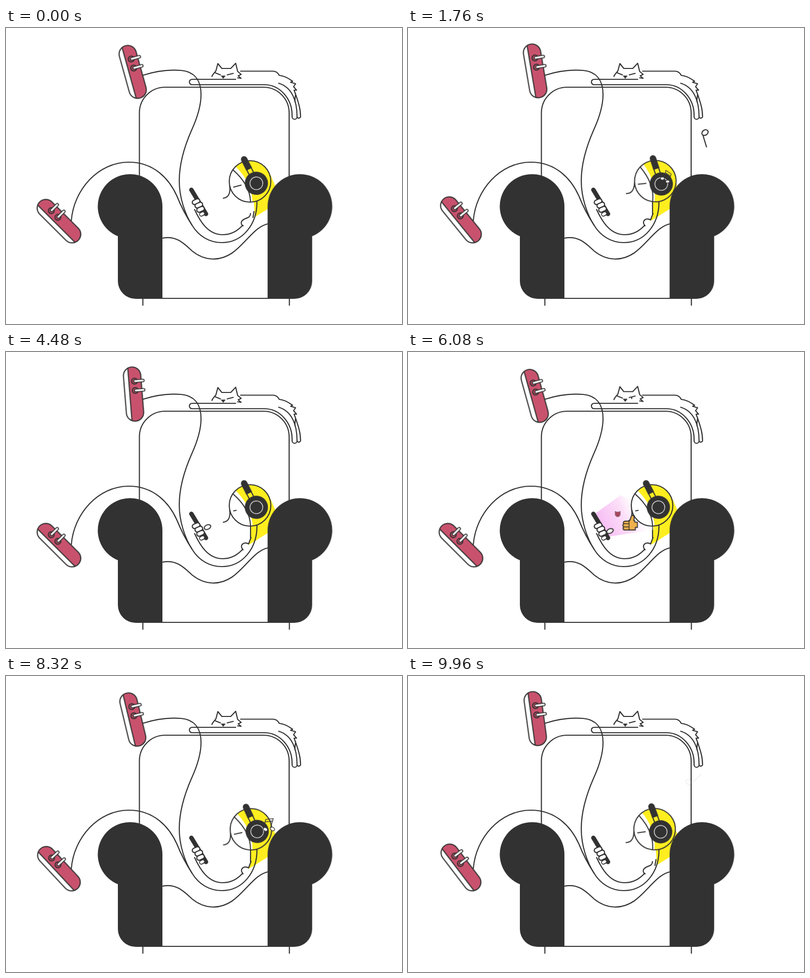
An HTML page without scripts for the animation above (10 s loop, 800 px wide and 600 px high).

```html
<!DOCTYPE html>
<html lang="en">
<head>
<meta charset="utf-8">
<title>Listening in the armchair</title>
<style>
  html, body { margin: 0; width: 100%; height: 100%; overflow: hidden; background: #fff; }
  svg { display: block; width: 100vw; height: 100vh; }
  .line { fill: none; stroke: #323232; stroke-width: 2.2; stroke-linecap: round; stroke-linejoin: round; }
  .white { fill: #fff; }
  .rose { fill: #c8526d; }
  .dark { fill: #323232; }
  .yellow { fill: #ffee1f; }

  .bob, .toe, .nod { animation: bob 10s cubic-bezier(.37, 0, .63, 1) infinite; }
  .bob { transform-origin: 132px 390px; }
  .toe { transform-origin: 276px 96px; animation-name: toe; }
  .nod { transform-origin: 500px 353px; animation-name: nod; }

  @keyframes bob {
    0%, 10.13%, 20.27%, 30.4%, 40.53%, 73%, 81.7%, 92.35% { transform: rotate(0deg); }
    5.07%, 15.2%, 25.33%, 35.47%, 77.35%, 87% { transform: rotate(11deg); }
    97.67% { transform: rotate(11deg); animation-timing-function: cubic-bezier(.4, 0, .8, .7); }
    100% { transform: rotate(6.6deg); }
  }
  @keyframes toe {
    0%, 10.13%, 20.27%, 30.4%, 40.53%, 50.66%, 60.8%, 73%, 81.7%, 92.35% { transform: rotate(0deg); }
    5.07%, 15.2%, 25.33%, 35.47%, 45%, 55.73%, 66.9%, 77.35%, 87% { transform: rotate(11deg); }
    97.67% { transform: rotate(11deg); animation-timing-function: cubic-bezier(.4, 0, .8, .7); }
    100% { transform: rotate(6.6deg); }
  }
  @keyframes nod {
    0%, 11.1%, 21.5%, 30.8%, 40.6%, 73%, 81.4%, 92.35% { transform: rotate(0deg); }
    5.6%, 16.6%, 26.3%, 35.6%, 77.2%, 86.8% { transform: rotate(10deg); }
    97.67% { transform: rotate(10deg); animation-timing-function: cubic-bezier(.4, 0, .8, .7); }
    100% { transform: rotate(6deg); }
  }

  /* hard switches */
  .tucked { animation: tucked 10s step-end infinite; }
  .loose { animation: loose 10s step-end infinite; }
  .awake { animation: awake 10s step-end infinite; }
  .asleep { animation: asleep 10s step-end infinite; }
  .peeking { animation: peeking 10s step-end infinite; }
  .napping { animation: napping 10s step-end infinite; }
  @keyframes tucked { 0%, 25%, 90% { opacity: 1; } 11%, 42.5% { opacity: 0; } }
  @keyframes loose { 0%, 25%, 90% { opacity: 0; } 11%, 42.5% { opacity: 1; } }
  @keyframes awake { 0%, 73% { opacity: 0; } 42% { opacity: 1; } }
  @keyframes asleep { 0%, 73% { opacity: 1; } 42% { opacity: 0; } }
  @keyframes peeking { 0%, 70% { opacity: 0; } 54% { opacity: 1; } }
  @keyframes napping { 0%, 70% { opacity: 1; } 54% { opacity: 0; } }

  .ears { animation: ears 10s infinite; }
  @keyframes ears { 0%, 53%, 72%, 100% { transform: none; } 55%, 70% { transform: translateY(-1.7px); } }

  .phone { transform-origin: 389px 353px; animation: tilt 10s infinite; }
  @keyframes tilt { 0%, 30%, 37%, 100% { transform: none; } 33%, 34% { transform: rotate(-7deg); } }

  .thumb { animation: tap 10s infinite; }
  @keyframes tap {
    0%, 42%, 73%, 100% { opacity: 0; transform: none; }
    43%, 45.5%, 52%, 57%, 64%, 69% { opacity: 1; transform: none; }
    48%, 54%, 60.8%, 66%, 72% { opacity: 1; transform: translate(1px, 8px); }
  }
  .glow { animation: glow 10s infinite; }
  @keyframes glow { 0%, 49%, 71%, 100% { opacity: 0; } 51%, 69% { opacity: 1; } }
  .like { animation: like 10s ease-out infinite; }
  .imp { animation: imp 10s ease-out infinite; }
  @keyframes like {
    0%, 54% { opacity: 0; transform: translate(394px, 353px) scale(.2); }
    55% { opacity: 1; }
    60.8% { opacity: 1; transform: translate(448.5px, 347px) scale(1.06); }
    66%, 100% { opacity: 0; transform: translate(478px, 343px) scale(1.15); }
  }
  @keyframes imp {
    0%, 58% { opacity: 0; transform: translate(394px, 350px) scale(.2); }
    58.5% { opacity: 1; }
    60.8% { opacity: 1; transform: translate(423.5px, 328px); }
    68%, 100% { opacity: 0; transform: translate(464px, 305px) scale(2); }
  }

  .note { opacity: 0; animation: 10s linear infinite; }
  .n1 { animation-name: n1; }
  .n2 { animation-name: n2; }
  .n3 { animation-name: n3; }
  .n4 { animation-name: n4; }
  @keyframes n1 {
    0%, 10.8% { opacity: 0; transform: translate(508px, 314px) scale(.3); }
    11.2% { opacity: 1; }
    17.6% { opacity: 1; transform: translate(600px, 212px); }
    25% { opacity: 1; }
    30%, 100% { opacity: 0; transform: translate(629px, 203px) rotate(-15deg); }
  }
  @keyframes n2 {
    0%, 15.5% { opacity: 0; transform: translate(508px, 316px) scale(.35); }
    16% { opacity: 1; }
    17.6% { opacity: 1; transform: translate(521px, 301px) scale(.55) rotate(12deg); }
    25% { opacity: 1; transform: translate(536px, 236px) scale(.9) rotate(10deg); }
    30.5% { opacity: 1; }
    33.2% { opacity: .07; transform: translate(528px, 189px); }
    33.8%, 100% { opacity: 0; transform: translate(527px, 186px); }
  }
  @keyframes n3 {
    0%, 81.8% { opacity: 0; transform: translate(508px, 316px) scale(.35) rotate(15deg); }
    82.2% { opacity: 1; }
    83.2% { opacity: 1; transform: translate(533px, 302px) scale(.65) rotate(15deg); }
    90% { opacity: 1; transform: translate(604px, 243px) rotate(5deg); }
    94.5% { opacity: 1; }
    98.5%, 100% { opacity: 0; transform: translate(631px, 211px) rotate(-8deg); }
  }
  @keyframes n4 {
    0%, 86.5% { opacity: 0; transform: translate(508px, 314px) scale(.3) rotate(-120deg); }
    87% { opacity: 1; }
    92% { opacity: 1; transform: translate(552px, 262px) rotate(-130deg); }
    97% { opacity: 1; }
    99.6% { opacity: .07; transform: translate(568px, 215px) rotate(-118deg); }
    100% { opacity: 0; transform: translate(569px, 212px) rotate(-118deg); }
  }
</style>
</head>
<body>
<svg viewBox="0 0 800 600">
  <defs>
    <clipPath id="skull"><circle cx="493" cy="311" r="42"/></clipPath>
    <linearGradient id="beam" gradientUnits="userSpaceOnUse" x1="390" y1="352" x2="470" y2="315">
      <stop offset="0" stop-color="#f7bdf4"/>
      <stop offset=".6" stop-color="#fce0f8"/>
      <stop offset="1" stop-color="#fff" stop-opacity=".3"/>
    </linearGradient>
    <g id="lace">
      <circle class="line" style="fill:#b5475f" r="6"/>
      <path class="line" style="stroke-width:7" d="M1 0H17"/>
      <path class="line" style="stroke:#fff;stroke-width:3.4" d="M1 0H17"/>
    </g>
    <g id="shoe">
      <rect class="white" x="-17.5" y="-55" width="35" height="110" rx="17.5"/>
      <path class="rose" d="M-7.5 -53.3A17.5 17.5 0 0 1 17.5 -37.5V37.5A17.5 17.5 0 0 1 -7.5 53.3Z"/>
      <path class="line" d="M-7.5 -53V53"/>
      <rect class="line" x="-17.5" y="-55" width="35" height="110" rx="17.5"/>
      <use href="#lace" x="4" y="-26"/>
      <use href="#lace" x="4" y="-7"/>
    </g>
    <g id="single" class="line">
      <path d="M-4 6L3 29"/>
      <ellipse class="white" rx="6.8" ry="5.2" transform="rotate(-35)"/>
    </g>
    <g id="pair" class="line">
      <path d="M-4 9L-5 -22L17 -13L16 16M-5 -14L17 -5"/>
      <ellipse class="white" cx="-11" cy="10" rx="7" ry="5.2" transform="rotate(-15 -11 10)"/>
      <ellipse class="white" cx="10" cy="17" rx="7" ry="5.2" transform="rotate(-15 10 17)"/>
    </g>
    <path id="arm" class="dark" d="M316 549V361.5A65.3 65.3 0 1 0 226 422V513A36 36 0 0 0 262 549Z"/>
    <rect id="finger" class="line white" x="-8" y="-4.5" width="16" height="9" rx="4.5"/>
  </defs>

  <!-- chair -->
  <path class="line" d="M269.5 305V172A52 52 0 0 1 321.500 120H520A52 52 0 0 1 572 172V305M310 548H535M276.5 548V562M572.5 548V562"/>
  <path class="line" d="M316 426C344 420 360 437 376 452C402 473 432 473 457 456C484 437 502 403 529 397"/>

  <!-- cat -->
  <g class="line">
    <path d="M464 104H376A5.5 5.5 0 0 0 376 115H522A56 62 0 0 1 578 177V180A5 5 0 0 0 588 180C588 146 577 120 551 112"/>
    <path d="M474 87.5H540C547 88 550 92 552 96C562 97 571 102 579 108L575 110L585 113L581 119L587 126L582 126L585 134C584 143 583 147 584 150M585 134C590 149 595 163 595 178A3.6 3.6 0 0 1 588 180"/>
    <g class="ears">
      <path d="M416 98C418 93 421 91 424 87L428 72L436 82H454L464 71.5L468 88L475 94L469 97L475 102L468 101"/>
      <path d="M423 91L433 95"/>
      <path class="dark" style="stroke-width:1" d="M435 97H443L439 102Z"/>
      <path class="napping" d="M447 95L459 92"/>
      <path class="peeking" d="M447 94L459 91M452 94V96"/>
    </g>
  </g>

  <!-- legs, arm and back -->
  <g class="line">
    <path d="M276 96C303 87 332 84 354 86C384 89 394 110 394 135C394 161 385 185 375 207C360 241 350 275 350 310C350 344 362 378 376 400"/>
    <path d="M132 390C137 328 186 272 248 272C300 272 330 307 345 340C355 365 363 380 376 400C390 423 412 435 436 435"/>
  </g>
  <path class="yellow" d="M500 345L534 297L544 320L540 360L503 383Z"/>
  <path class="yellow loose" d="M495 345H510V379L490 391C494 379 495 365 495 345Z"/>
  <path class="line" d="M436 435C478 435 507 398 507 353C506 346 503 341 499 336"/>
  <path class="line" d="M381 368C392 392 408 419 438 419C455 419 468 411 478 400"/>
  <path class="line tucked" d="M494 376C493 388 482 383 476 392C474 397 476 399 479 401M501 372L499 384"/>
  <path class="line loose" d="M494 345V377M495 376L490 389C481 383 470 392 479 401"/>

  <path class="glow" fill="url(#beam)" d="M379 327L430 290L475 315L500 360L407 374Z"/>

  <!-- head -->
  <g class="nod">
    <circle class="white" cx="493" cy="311" r="42"/>
    <path class="yellow" clip-path="url(#skull)" d="M463 280C483 300 497 322 498 353L540 360V262H470Z"/>
    <circle class="line" cx="493" cy="311" r="42"/>
    <path class="line" d="M459 288C476 303 493 324 494 352M452 320C454 337 448 344 439 345"/>
    <path class="line asleep" d="M460 322.5L475 318.5"/>
    <path class="line awake" d="M460 322L465 321"/>
    <g transform="translate(505.8 314.8) rotate(-27)">
      <rect class="line yellow" x="-5" y="-36" width="10" height="20"/>
      <path class="dark" d="M-6.5 -32V-54.5A6.5 6.5 0 0 1 6.5 -54.5V-32Z"/>
      <circle class="dark" r="23.5"/>
      <circle r="12.9" fill="none" stroke="#fff" stroke-width="1.3"/>
    </g>
  </g>

  <use href="#arm"/>
  <use href="#arm" transform="matrix(-1 0 0 1 844.5 0)"/>

  <!-- shoes -->
  <g class="toe"><use href="#shoe" transform="translate(256 89) rotate(-15.5)"/></g>
  <g class="bob"><use href="#shoe" transform="translate(107 391.5) rotate(-45)"/></g>

  <!-- phone and hand -->
  <path class="line phone" style="stroke-width:9" d="M374.5 328L404 377"/>
  <use href="#finger" transform="translate(384 352) rotate(-24)"/>
  <use href="#finger" transform="translate(389.5 359) rotate(-24)"/>
  <use href="#finger" transform="translate(393 367.5) rotate(-24)"/>
  <use href="#finger" transform="translate(396 377) rotate(-28) scale(.65 .8)"/>
  <g class="thumb"><ellipse class="line white" rx="7" ry="4.5" transform="translate(407 355) rotate(-25)"/></g>

  <g class="like">
    <path class="line" style="fill:#efb04c;stroke-width:1.8" d="M-2 -4C2 -7 1 -15 4 -15C9 -15 8 -9 7 -5H9V-2H14V8H10V13H-10C-14 13 -14 8 -12 7C-15 5 -14 2 -12 1C-14 -2 -12 -4 -9 -4Z"/>
    <path class="line" style="stroke-width:1.4" d="M-12 1H-2M-12 7H-2M-2 -4V13"/>
  </g>
  <g class="imp">
    <path class="rose" stroke="#323232" stroke-width=".8" d="M-5 -5L-2.5 -3.5H2.5L5 -5V1A5 5 0 0 1 -5 1Z"/>
    <path fill="none" stroke="#323232" d="M-3 -1L-1 0M3 -1L1 0M-2 3Q0 1.5 2 3"/>
  </g>

  <!-- music -->
  <g class="note n1"><use href="#single"/></g>
  <g class="note n2"><use href="#pair"/></g>
  <g class="note n3"><use href="#pair" transform="scale(-1 1)"/></g>
  <g class="note n4"><use href="#single"/></g>
</svg>
</body>
</html>
```
